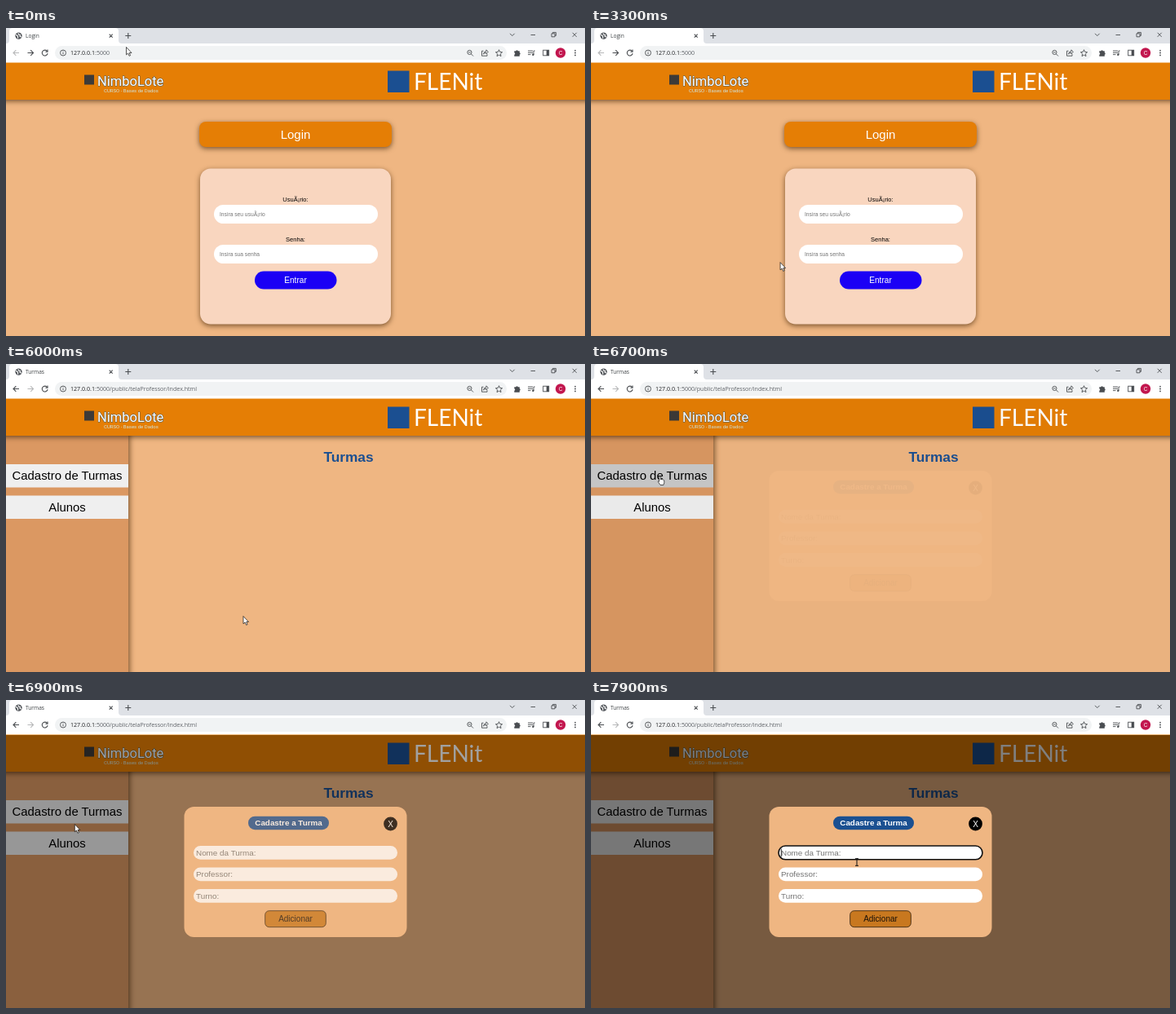
An HTML page that plays this animation: 710x378 px, repeating every 8000 ms.

```html
<!DOCTYPE html>
<html lang="pt">
<head>
<meta charset="utf-8">
<title>Login</title>
<style>
html, body { margin: 0; width: 100%; height: 100%; overflow: hidden; }
svg { display: block; width: 710px; height: 378px; font-family: "Liberation Sans", Arial, sans-serif; }
.mid { text-anchor: middle; }
.ui { font-family: "Open Sans", sans-serif; fill: #3c4043; }
.line { fill: none; stroke: #4a4d51; stroke-width: 1.1; }
.hint { fill: #757575; }
.shade { filter: drop-shadow(0 2px 3px rgba(60, 30, 0, .65)); }
.bold { font-weight: bold; }
</style>
</head>
<body>
<svg viewBox="0 0 710 378">
  <rect width="710" height="378" fill="#efb682"/>

  <g id="login">
    <rect class="shade" x="237" y="115" width="236" height="31" rx="8" fill="#e57e05"/>
    <text class="mid" x="355" y="136" font-size="15" fill="#fff">Login</text>
    <rect class="shade" x="238" y="172.5" width="234" height="191" rx="13" fill="#f9d6bf"/>
    <g font-size="7.5" class="mid">
      <text x="355" y="213">UsuÃ¡rio:</text>
      <text x="355" y="262">Senha:</text>
    </g>
    <rect x="255" y="217" width="201" height="23" rx="11.5" fill="#fff"/>
    <rect x="255" y="266" width="201" height="23" rx="11.5" fill="#fff"/>
    <g font-size="6.7" class="hint">
      <text x="262" y="230.6">Insira seu usuÃ¡rio</text>
      <text x="262" y="279.6">Insira sua senha</text>
    </g>
    <rect id="enter" x="305" y="298.5" width="100.5" height="22" rx="11"/>
    <text class="mid" x="355" y="312.6" font-size="10.1" fill="#fff">Entrar</text>
  </g>

  <g id="classes">
    <rect x="0" y="80" width="150" height="310" fill="#db9862" style="filter:drop-shadow(2px 0 3px rgba(60,30,0,.6))"/>
    <rect id="register" y="123" width="150" height="28.5"/>
    <rect y="161.5" width="150" height="28.5" fill="#efefef"/>
    <g class="mid" font-size="14.9">
      <text x="75" y="142.3">Cadastro de Turmas</text>
      <text x="75" y="181">Alunos</text>
    </g>
    <text class="mid bold" x="420" y="119.5" font-size="17.3" fill="#1b4f91">Turmas</text>
  </g>

  <g id="header">
    <rect class="shade" x="-10" y="30" width="730" height="58" fill="#e57e05"/>
    <rect x="96" y="57.5" width="12" height="12" fill="#3d3a38"/>
    <text x="112" y="71" font-size="16.5" fill="#fff" stroke="#3f5a66" stroke-width=".9" paint-order="stroke" font-family="Roboto, sans-serif">NimboLote</text>
    <text x="120" y="78.6" font-size="6" fill="#cfe3df" font-family="Roboto, sans-serif">CURSO - Bases de Dados</text>
    <rect x="468" y="52.5" width="26.5" height="26.5" fill="#1b4f91"/>
    <text x="500" y="76" font-size="28" fill="#fff" font-family="Lato, sans-serif">FLENit</text>
  </g>

  <g id="modal">
    <rect y="43" width="710" height="335" opacity=".5"/>
    <rect x="218.5" y="131" width="273" height="160" rx="12" fill="#efb682"/>
    <rect x="297" y="142.7" width="99" height="16.5" rx="8.2" fill="#1b5091"/>
    <text class="mid bold" x="346.5" y="154.3" font-size="9.85" fill="#fff">Cadastre a Turma</text>
    <circle cx="471.5" cy="152" r="8.4"/>
    <text class="mid" x="471.5" y="155.6" font-size="10" fill="#fff">X</text>
    <g fill="#fff">
      <rect id="field" x="230" y="179" width="250" height="16.8" rx="8.4" stroke="#111"/>
      <rect x="230" y="205.5" width="250" height="16.8" rx="8.4"/>
      <rect x="230" y="232" width="250" height="16.8" rx="8.4"/>
    </g>
    <g font-size="9.9" class="hint">
      <text x="233" y="190.8">Nome da Turma:</text>
      <text x="233" y="217.3">Professor:</text>
      <text x="233" y="243.8">Turno:</text>
    </g>
    <path id="caret" d="M233.3 182.5v10" stroke="#000" stroke-width=".8"/>
    <rect x="317.7" y="258.7" width="74.6" height="20" rx="5" fill="#c8781f" stroke="#2b1c0c" stroke-width=".8"/>
    <text class="mid" x="355" y="272.3" font-size="10" fill="#1c1208">Adicionar</text>
  </g>

  <g id="browser">
    <rect width="710" height="20" fill="#dee1e6"/>
    <path d="M0 19q4 0 4-4V4q0-4 4-4H134q4 0 4 4v11q0 4 4 4z" fill="#fff"/>
    <rect y="19" width="710" height="23.5" fill="#fff"/>
    <rect x="60" y="22" width="554" height="17" rx="8.5" fill="#f1f3f4"/>
    <g id="globe">
      <circle cx="15.5" cy="9.6" r="4.2" fill="#54585c"/>
      <path d="M12 8.2l2.4 1.6.2 2.8M15 6.3l.4 1.7 2 .4-.4 2 1.7.5" class="line" style="stroke:#fff"/>
    </g>
    <text id="tab" class="ui" x="24" y="12" font-size="6.6"></text>
    <g class="line">
      <path d="M126.7 7.6l4 4m0-4l-4 4M146.3 9.5h7m-3.5-3.5v7"/>
      <path d="M618 6.8l2.8 2.8 2.8-2.8M643.5 8.5h5.5M669 6.8h4v4h-4zM670.4 6.6V5.4h4v4H673M694.7 5.8l5 5m0-5l-5 5" stroke-width=".9"/>
      <path id="back" d="M16 30.5H9m3.3-3.3L9 30.5l3.3 3.3"/>
      <path id="forward" d="M26.5 30.5h7m-3.3-3.3l3.3 3.3-3.3 3.3"/>
      <path id="reload" d="M50.3 28.4a3.4 3.4 0 1 0 .7 2.7M51 26.6v2.6h-2.6"/>
      <path id="stop" d="M44.7 27.7l5.6 5.6m0-5.6l-5.6 5.6"/>
      <g stroke-width=".9">
        <circle cx="70" cy="30.5" r="3.5"/>
        <path d="M70 30v2.3M70 28.4v.9"/>
        <circle cx="568.4" cy="29.9" r="2.6"/>
        <path d="M570.4 31.9l2.6 2.6M567.2 29.9h2.4"/>
        <path d="M585.5 28.2h-2v6h6.500v-2M585.500 32q.5-3.500 3.500-3.500v-1.700l2.300 2.500-2.300 2.500v-1.600q-2.300 0-3.500 1.800z"/>
        <path d="M604.5 26.700l1.200 2.700 2.900.3-2.200 2 .6 2.900-2.500-1.500-2.500 1.500.6-2.900-2.200-2 2.900-.3z"/>
        <path d="M640 28h6m-6 2.300h6m-6 2.300h3.500M647 28v5m0-5h1.600"/>
        <rect x="658.700" y="27.200" width="7" height="6.600"/>
      </g>
    </g>
    <g fill="#4a4d51">
      <path d="M623.300 28.200h2a1.300 1.300 0 0 1 2.500 0h2v2a1.300 1.300 0 0 1 0 2.500v2h-6.500v-2a1.300 1.300 0 0 0 0-2.500z"/>
      <circle cx="646.300" cy="32.800" r="1.200"/>
      <path d="M662.700 27h3v7h-3z"/>
      <circle cx="698" cy="27.600" r=".9"/>
      <circle cx="698" cy="30.500" r=".9"/>
      <circle cx="698" cy="33.400" r=".9"/>
    </g>
    <circle cx="680" cy="30.500" r="6.200" fill="#c2174f"/>
    <text class="mid" x="680" y="32.900" font-size="6.500" fill="#fff">C</text>
    <text class="ui" x="79" y="33" font-size="7.100" style="fill:#202124">127.0.0.1<tspan id="path" fill="#5f6368"></tspan></text>
  </g>

  <g id="cursor" stroke="#111" stroke-width=".7" fill="#fff">
    <path id="arrow" d="M0 0V9.300L2.100 7.500 3.600 10.800 5.100 10.100 3.700 7H6.500z"/>
    <path id="hand" d="M.2 .5q1-1 1.700 0V4q3.500 0 4.300 1.300.5 3-.8 5.700H1.500L-1.500 6.700q.2-1 1.700 0z"/>
    <path id="beam" d="M-2-4.300h4M0-4.300v8.600M-2 4.300h4" stroke-width="1"/>
  </g>
</svg>
<script>
const $ = id => document.getElementById(id);
const show = (id, on) => $(id).style.display = on ? "" : "none";
const fill = (id, color) => $(id).setAttribute("fill", color);
const clamp = v => Math.max(0, Math.min(1, v));

// time, x, y of the pointer
const route = [
  [0, 147.5, 23.5], [1900, 147.5, 23.5], [2100, 72, 248.5], [2900, 72, 248.5],
  [3600, 336, 313], [5900, 336, 313], [6000, 291, 309.5], [6500, 83.5, 137.5],
  [6800, 83.5, 137.5], [6900, 84.300, 152.500], [7500, 352, 147], [7700, 326, 199], [8000, 326, 199]
];

function pointer(t) {
  const i = route.findIndex(p => p[0] > t);
  const [t0, x0, y0] = route[i - 1], [t1, x1, y1] = route[i];
  const k = (t - t0) / (t1 - t0), e = k * k * (3 - 2 * k);
  return [x0 + (x1 - x0) * e, y0 + (y1 - y0) * e];
}

function draw(t) {
  const [x, y] = pointer(t);
  const second = t >= 5200, loading = t >= 5100 && !second;
  const onEnter = x > 305 && x < 405 && y > 298 && y < 321;
  const onRegister = second && t < 6900 && x < 150 && y > 123 && y < 151;
  const focused = t >= 7700;

  show("login", !second);
  show("classes", second);
  show("globe", !loading);
  show("reload", !loading);
  show("stop", loading);
  $("tab").textContent = second ? "Turmas" : "Login";
  $("path").textContent = ":5000" + (second ? "/public/telaProfessor/index.html" : "");
  $("back").style.opacity = second ? 1 : .4;
  $("forward").style.opacity = second ? .4 : 1;

  fill("enter", onEnter ? "#2a8c0a" : "#1b00f5");
  $("enter").setAttribute("class", onEnter ? "shade" : "");
  fill("register", onRegister ? "#c9c9c9" : "#efefef");

  $("modal").style.opacity = clamp((t - 6690) / 285);
  $("field").setAttribute("stroke-width", focused ? 1.6 : 0);
  show("caret", focused);

  show("arrow", !onRegister && !focused);
  show("hand", onRegister);
  show("beam", focused);
  $("cursor").setAttribute("transform", `translate(${x} ${y})`);
}

const start = performance.now();
function tick() {
  draw(Math.floor((performance.now() - start) % 8000 / 100) * 100);
  requestAnimationFrame(tick);
}
tick();
</script>
</body>
</html>
```
